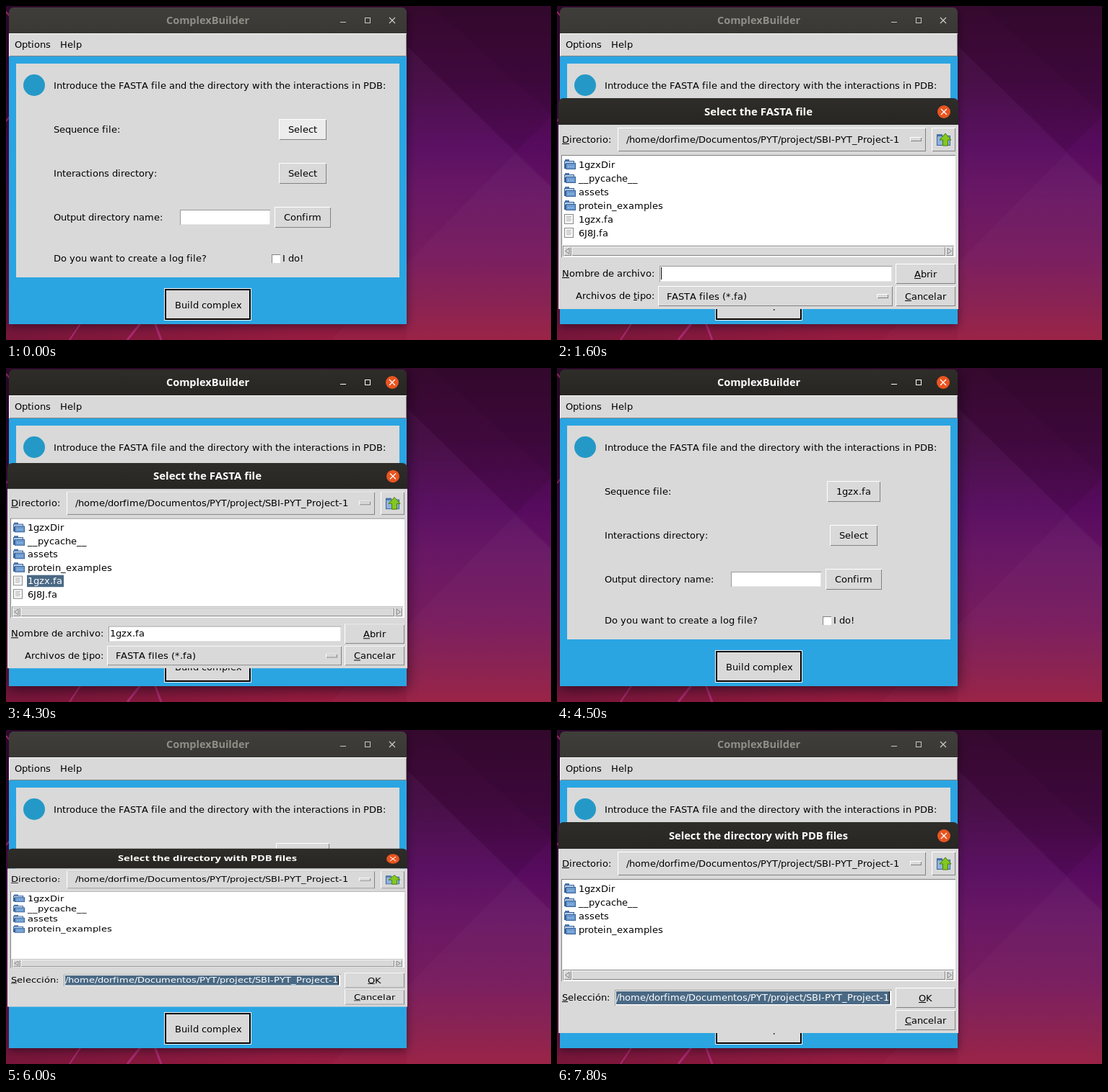
An HTML page with a canvas that plays this animation: 755 px wide and 464 px high, repeating every 8000 ms.

```html
<!DOCTYPE html>
<html lang="en">
<head>
<meta charset="utf-8">
<title>ComplexBuilder</title>
<style>
html, body { margin: 0; width: 100%; height: 100%; overflow: hidden; background: #3a0a30; }
canvas { display: block; }
</style>
</head>
<body>
<canvas id="stage" width="755" height="464"></canvas>
<script>
const ctx = document.getElementById('stage').getContext('2d');
const SANS = '13px "DejaVu Sans", Verdana, sans-serif';
const GREY = '#d9d9d9', HOVER = '#ececec', DARK = '#828282', SELECT = '#4a6984';
const PATH = '/home/dorfime/Documentos/PYT/project/SBI-PYT_Project-1';
const LOOP = 8000;

// All boxes are given by their edges: left, top, right, bottom.
function box(l, t, r, b, color) {
  ctx.fillStyle = color;
  ctx.fillRect(l, t, r - l, b - t);
}

function poly(points, color) {
  ctx.fillStyle = color;
  ctx.beginPath();
  points.forEach(p => ctx.lineTo(...p));
  ctx.fill();
}

function line(points, color, width = 1) {
  ctx.strokeStyle = color;
  ctx.lineWidth = width;
  ctx.beginPath();
  points.forEach(p => ctx.lineTo(...p));
  ctx.stroke();
}

function disc(x, y, r, color) {
  ctx.fillStyle = color;
  ctx.beginPath();
  ctx.arc(x, y, r, 0, 7);
  ctx.fill();
}

function bevel(l, t, r, b, fill = GREY, sunken = false, light = '#fff', dark = DARK) {
  box(l, t, r, b, sunken ? dark : light);
  box(l + 1, t + 1, r, b, sunken ? light : dark);
  box(l + 1, t + 1, r - 1, b - 1, fill);
}

function entry(l, t, r, b) {
  bevel(l, t, r, b, '#fff', true, '#e6e6e6', '#999');
}

// Glyphs sit on whole pixels, as in a hinted toolkit font.
const advance = ch => Math.round(ctx.measureText(ch).width);

// y is the middle of the text line; key is the index of an underlined letter.
function text(str, x, y, { color = '#000', center = false, key = -1 } = {}) {
  ctx.font = SANS;
  ctx.textAlign = 'left';
  ctx.fillStyle = color;
  const glyphs = [...str];
  if (center) x = Math.round(x - glyphs.reduce((sum, ch) => sum + advance(ch), 0) / 2);
  glyphs.forEach((ch, i) => {
    const next = x + advance(ch);
    ctx.fillText(ch, x, y + 5);
    if (i === key) box(x, y + 6, next, y + 7, color);
    x = next;
  });
}

function button(l, t, r, b, label, opts = {}) {
  bevel(l, t, r, b, opts.fill, opts.sunken);
  text(label, (l + r) / 2, Math.floor((t + b) / 2), { center: true, key: opts.key });
}

function menuButton(l, t, r, b, label, fill) {
  const mid = Math.floor((t + b) / 2);
  bevel(l, t, r, b, fill);
  text(label, l + 12, mid);
  bevel(r - 22, mid - 3, r - 6, mid + 3, fill);
}

function titleBar(l, t, r, b, title, size, focused) {
  const fill = ctx.createLinearGradient(0, t, 0, b);
  fill.addColorStop(0, focused ? '#2e2d29' : '#3f3e3a');
  fill.addColorStop(1, focused ? '#272622' : '#393834');
  ctx.fillStyle = fill;
  ctx.beginPath();
  ctx.roundRect(l, t, r - l, b - t, [7, 7, 0, 0]);
  ctx.fill();
  ctx.font = `bold ${size}px "Open Sans", "Noto Sans", sans-serif`;
  ctx.textAlign = 'center';
  ctx.fillStyle = focused ? '#fff' : '#918e88';
  ctx.fillText(title, (l + r) / 2, (t + b) / 2 + 5);
}

function closeButton(x, y, focused) {
  if (focused) disc(x, y, 9, '#e95420');
  const color = focused ? '#fff' : '#c9c7c3';
  line([[x - 4, y - 4], [x + 4, y + 4]], color, 1.2);
  line([[x - 4, y + 4], [x + 4, y - 4]], color, 1.2);
}

function shadow(l, t, r, b, blur, alpha) {
  ctx.save();
  ctx.shadowColor = `rgba(0,0,0,${alpha})`;
  ctx.shadowBlur = blur;
  ctx.shadowOffsetY = 3;
  ctx.beginPath();
  ctx.roundRect(l, t, r - l, b - t, [7, 7, 0, 0]);
  ctx.fillStyle = '#333';
  ctx.fill();
  ctx.restore();
}

function gradient(x, y, colors) {
  const g = ctx.createLinearGradient(0, 0, x, y);
  colors.forEach(([at, c]) => g.addColorStop(at, c));
  return g;
}

function desktop() {
  box(0, 0, 755, 464, gradient(0, 464, [[0, '#390a32'], [.22, '#440a43'], [.42, '#570b5e'],
    [.55, '#641161'], [.75, '#74165a'], [.9, '#861a4b'], [1, '#961b3e']]));
  box(0, 0, 400, 464, gradient(400, 0, [[0, 'rgba(30,5,40,.25)'], [1, 'rgba(30,5,40,0)']]));
  poly([[555, 0], [755, 0], [755, 153], [705, 203], [555, 55]], 'rgba(20,0,15,.1)');
  poly([[590, 0], [755, 0], [755, 150]], 'rgba(20,0,15,.07)');
  poly([[555, 55], [755, 250], [755, 464], [555, 464]], 'rgba(255,255,255,.025)');
  poly([[705, 205], [755, 252], [755, 464], [450, 464]], 'rgba(255,255,255,.02)');
  const pink = '#a92a70';
  line([[88, 464], [104, 440]], pink, 2);
  line([[168, 464], [187, 440]], pink, 3);
  line([[206, 440], [215, 464]], pink, 3);
  line([[0, 8], [5, 14]], pink, 2);
  line([[0, 160], [5, 154]], pink, 2);
}

function mainWindow(s) {
  shadow(4, 2, 555, 442, s.focused ? 20 : 13, s.focused ? .6 : .45);
  titleBar(4, 2, 555, 38, 'ComplexBuilder', 14.5, s.focused);
  const icon = s.focused ? '#fff' : '#c9c7c3';
  box(463, 22, 471, 23, icon);
  ctx.strokeStyle = icon;
  ctx.lineWidth = 1;
  ctx.strokeRect(497.5, 16.5, 7, 7);
  closeButton(535, 20, s.focused);

  bevel(4, 38, 555, 70);
  text('Options', 12, 53);
  text('Help', 75, 53);
  box(4, 70, 555, 442, '#2aa5e2');
  box(14, 80, 545, 377, GREY);
  disc(39, 110, 15, '#2499c7');
  text('Introduce the FASTA file and the directory with the interactions in PDB:', 66, 110);

  text('Sequence file:', 66, 171);
  if (s.chosen) button(374, 157, 448, 186, '1gzx.fa');
  else button(378, 157, 444, 186, 'Select', s.sequence);
  text('Interactions directory:', 66, 232);
  button(378, 218, 444, 247, 'Select', s.interactions);
  text('Output directory name:', 66, 293);
  entry(241, 283, 366, 304);
  button(372, 279, 450, 308, 'Confirm');
  text('Do you want to create a log file?', 66, 350);
  bevel(368, 345, 380, 357, '#fff', true);
  text('I do!', 383, 350);

  box(219, 392, 340, 437, '#f4f4f4');
  box(220, 393, 339, 436, '#000');
  box(222, 395, 337, 434, GREY);
  text('Build complex', 280, 415, { center: true });
}

function folder(x, y) {
  box(x + 1, y - 7, x + 7, y - 3, '#4d78b0');
  box(x, y - 5, x + 14, y + 6, '#3a6298');
  box(x + 1, y - 4, x + 13, y - 1, '#b9d0ea');
  box(x + 2, y - 2, x + 16, y + 7, '#3a6298');
  box(x + 3, y - 1, x + 15, y + 6, '#6c9bd0');
  for (let i = 0; i < 3; i++) box(x + 5 + i * 3, y + 2, x + 7 + i * 3, y + 4, '#8db4e0');
}

function sheet(x, y) {
  box(x, y - 7, x + 13, y + 7, '#8b8b8b');
  box(x + 1, y - 6, x + 12, y + 6, '#f6f6f6');
  for (let i = 0; i < 4; i++) box(x + 3, y - 4 + i * 2, x + (i % 2 ? 9 : 10), y - 3 + i * 2, '#b5b5b5');
}

function upButton() {
  bevel(519, 169, 552, 202);
  box(526, 178, 534, 182, '#4d78b0');
  box(526, 180, 545, 194, '#3a6298');
  box(527, 181, 544, 193, '#8fb4dc');
  const arrow = [[538, 177], [546, 186], [541.5, 186], [541.5, 194], [534.5, 194], [534.5, 186], [530, 186]];
  poly(arrow, '#84c81e');
  line([...arrow, arrow[0]], '#4a7d0c');
}

function scrollBar() {
  bevel(8, 333, 550, 348, '#c3c3c3', true);
  bevel(9, 334, 20, 347);
  bevel(20, 334, 538, 347);
  bevel(538, 334, 549, 347);
  line([[17, 336.5], [11.5, 340.5], [17, 344.5], [17, 336.5]], DARK);
  line([[541, 336.5], [546.5, 340.5], [541, 344.5], [541, 336.5]], DARK);
}

function dialog(s) {
  ctx.save();
  ctx.translate(0, 275 * (1 - s.scale));
  ctx.scale(1, s.scale);
  if (s.folders) titleBar(2, 128, 556, 165, 'Select the directory with PDB files', 14.7, true);
  else titleBar(2, 128, 556, 165, 'Select the FASTA file', 15, true);
  closeButton(536, 147, true);
  box(2, 165, 556, 421, GREY);

  text('Directorio:', 7, 185, { key: 0 });
  menuButton(84, 169, 511, 202, PATH, s.pathHover ? HOVER : GREY);
  upButton();

  bevel(6, 207, 552, 349, '#fff', true);
  ['1gzxDir', '__pycache__', 'assets', 'protein_examples'].forEach((name, i) => {
    folder(10, 220 + i * 19);
    text(name, 30, 220 + i * 19);
  });
  if (!s.folders) {
    sheet(10, 296);
    if (s.picked) box(29, 288, 80, 305, SELECT);
    text('1gzx.fa', 30, 296, { color: s.picked ? '#fff' : '#000' });
    sheet(10, 315);
    text('6J8J.fa', 30, 315);
  }
  scrollBar();

  if (s.folders) {
    text('Selección:', 7, 371, { key: 0 });
    entry(80, 361, 464, 383);
    box(82, 363, 461, 381, SELECT);
    text(PATH, 82, 371, { color: '#fff' });
    if (s.caret) box(460, 363, 461, 380, '#000');
  } else {
    text('Nombre de archivo:', 7, 371, { key: 0 });
    entry(142, 361, 464, 383);
    if (s.picked) text('1gzx.fa', 144, 371);
    else if (s.caret) box(144, 363, 145, 380, '#000');
    text('Archivos de tipo:', 26, 402, { key: 12 });
    menuButton(140, 389, 465, 417, 'FASTA files (*.fa)');
  }
  button(469, 358, 552, 386, s.folders ? 'OK' : 'Abrir', { key: 0 });
  button(469, 389, 552, 417, 'Cancelar', { key: 0 });
  ctx.restore();
}

const within = (t, a, b) => t >= a && t < b;
const easeOut = p => 1 - (1 - Math.min(1, Math.max(0, p))) ** 2;

function dialogScale(t) {
  if (t < 4300) return easeOut((t - 1400) / 200);
  if (t < 4500) return 1 - easeOut((t - 4298) / 150);
  return easeOut((t - 5900) / 200);
}

// State of a Select button around its click.
function pointer(t, enter, press, leave) {
  return { fill: within(t, enter, leave) ? HOVER : GREY, sunken: within(t, press, press + 100) };
}

function draw(t) {
  const scale = dialogScale(t);
  desktop();
  mainWindow({
    focused: within(t, 1300, 1500) || within(t, 4300, 6000),
    chosen: t >= 4400,
    sequence: pointer(t, 0, 1300, 1400),
    interactions: pointer(t, 5100, 5700, 5900)
  });
  if (scale > 0) dialog({
    scale,
    folders: t >= 5900,
    picked: t >= 2900,
    pathHover: within(t, 2100, 2200),
    caret: !within(t, 2200, 2500) && !within(t, 6500, 6800) && !within(t, 7500, 7800)
  });
}

// The screen updates ten times a second.
function tick(now) {
  draw(Math.floor(now % LOOP / 100) * 100);
  requestAnimationFrame(tick);
}
draw(0);
requestAnimationFrame(tick);
</script>
</body>
</html>
```
